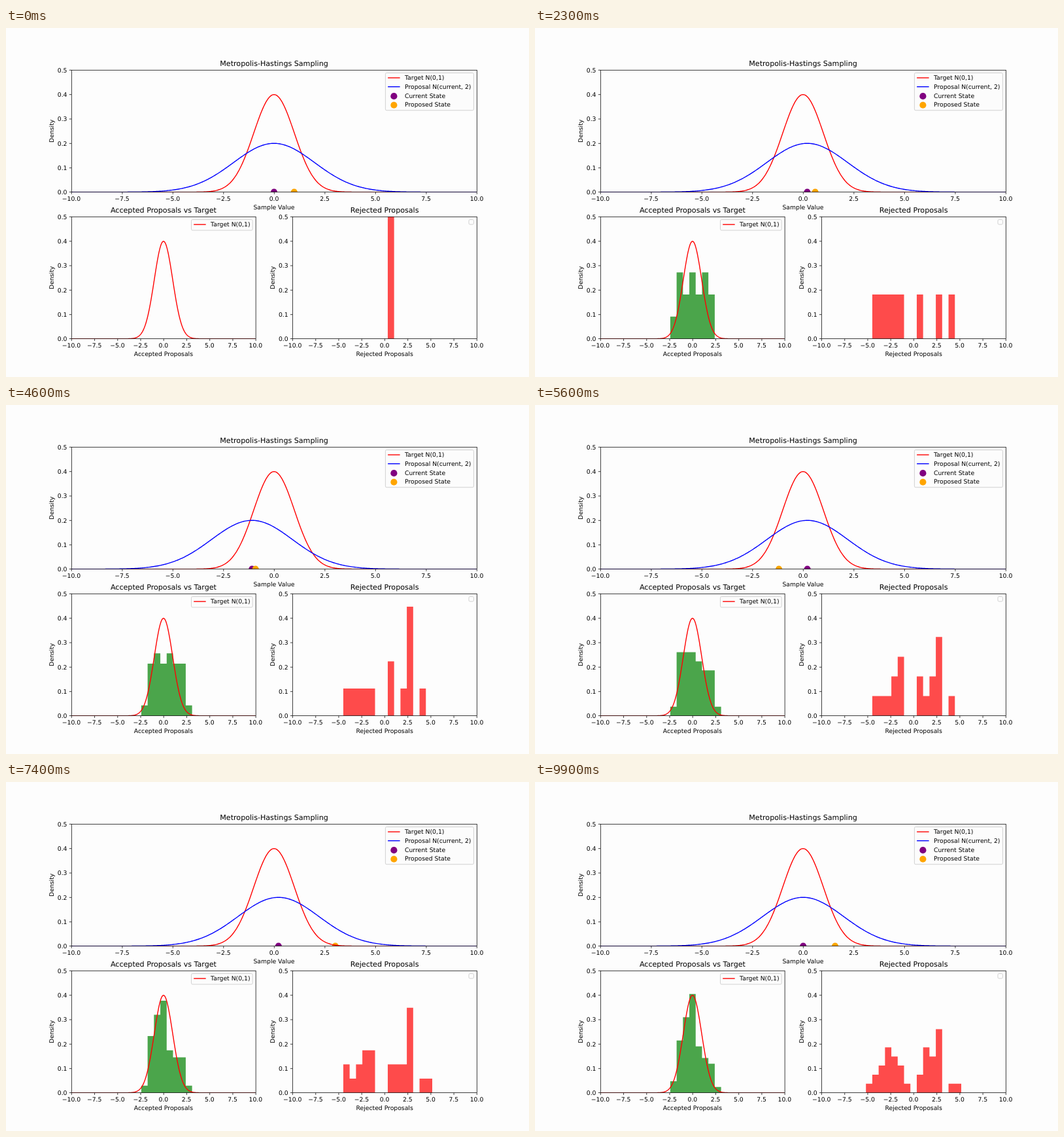
Recreate the animation shown at these times as an HTML page. Size 800x533 px, loop 10 s.

```html
<!DOCTYPE html>
<html lang="en">
<head>
<meta charset="utf-8">
<title>Metropolis-Hastings Sampling</title>
<style>
  html, body { margin: 0; width: 100%; height: 100%; overflow: hidden; background: #fdfdfd; }
  svg { display: block; width: 800px; height: 533px; }
  text { font: 9.26px "DejaVu Sans", sans-serif; text-rendering: geometricPrecision; }
  .title { font-size: 11.11px; }
  .mid { text-anchor: middle; }
  .end { text-anchor: end; }
  .line { fill: none; stroke-width: 1.39; stroke-linejoin: round; }
  .spine { fill: none; stroke: #000; stroke-width: .75; }
  .box { fill: #fdfdfd; fill-opacity: .8; stroke: #ccc; stroke-width: .9; }
</style>
</head>
<body>
<svg viewBox="0 0 800 533"></svg>
<script>
const svg = document.querySelector('svg');
const STEPS = 100, STEP_MS = 100, BINS = 29, HEIGHT = 186.67;

function add(parent, tag, attrs, text) {
  const el = document.createElementNS('http://www.w3.org/2000/svg', tag);
  for (const k in attrs) el.setAttribute(k, attrs[k]);
  if (text) el.textContent = text;
  parent.append(el);
  return el;
}

// Mersenne Twister giving 53-bit uniforms, with polar-method normals
function makeRandom(seed) {
  const s = new Uint32Array(624);
  let pos = 624, spare = null;
  s[0] = seed;
  for (let i = 1; i < 624; i++) s[i] = Math.imul(1812433253, s[i - 1] ^ (s[i - 1] >>> 30)) + i;
  function next() {
    if (pos === 624) {
      for (let i = 0; i < 624; i++) {
        const y = (s[i] & 0x80000000) | (s[(i + 1) % 624] & 0x7fffffff);
        s[i] = s[(i + 397) % 624] ^ (y >>> 1) ^ (y & 1 ? 0x9908b0df : 0);
      }
      pos = 0;
    }
    let y = s[pos++];
    y ^= y >>> 11;
    y ^= (y << 7) & 0x9d2c5680;
    y ^= (y << 15) & 0xefc60000;
    return (y ^ (y >>> 18)) >>> 0;
  }
  function uniform() {
    const a = next() >>> 5, b = next() >>> 6;
    return (a * 67108864 + b) / 9007199254740992;
  }
  function normal() {
    if (spare !== null) {
      const v = spare;
      spare = null;
      return v;
    }
    let a, b, r;
    do {
      a = 2 * uniform() - 1;
      b = 2 * uniform() - 1;
      r = a * a + b * b;
    } while (r >= 1 || r === 0);
    const f = Math.sqrt(-2 * Math.log(r) / r);
    spare = f * a;
    return f * b;
  }
  return { uniform, normal };
}

const density = (x, mean, sd) =>
  Math.exp(-(((x - mean) / sd) ** 2) / 2) / (sd * Math.sqrt(2 * Math.PI));

// Run the whole chain once
const random = makeRandom(42);
const chain = [];
for (let i = 0, current = 0; i < STEPS; i++) {
  const proposed = current + 2 * random.normal();
  const accepted = random.uniform() < density(proposed, 0, 1) / density(current, 0, 1);
  chain.push({ current, proposed, accepted });
  if (accepted) current = proposed;
}

function makePlot(id, left, top, width, title, xLabel) {
  const px = x => left + (x + 10) / 20 * width;
  const py = y => top + HEIGHT * (1 - y / 0.5);
  const bottom = top + HEIGHT, mid = left + width / 2;
  const clip = add(svg, 'clipPath', { id });
  add(clip, 'rect', { x: left, y: top, width, height: HEIGHT });
  const body = add(svg, 'g', { 'clip-path': `url(#${id})` });

  let ticks = '';
  for (let v = -10; v <= 10; v += 2.5) {
    ticks += `M${px(v) + .33} ${bottom}v3.24`;
    add(svg, 'text', { x: px(v), y: bottom + 13.5, class: 'mid' }, v.toFixed(1).replace('-', '\u2212'));
  }
  for (let i = 0; i <= 5; i++) {
    const y = py(i / 10);
    ticks += `M${left} ${y + (i ? .33 : -.17)}h-3.24`;
    add(svg, 'text', { x: left - 6.48, y: y + 3.5, class: 'end' }, (i / 10).toFixed(1));
  }
  add(svg, 'path', { d: ticks, class: 'spine' });
  add(svg, 'rect', { x: left + .33, y: top + .33, width, height: HEIGHT - .5, class: 'spine' });
  add(svg, 'text', { x: mid, y: top - 5.56, class: 'mid title' }, title);
  add(svg, 'text', { x: mid, y: bottom + 26, class: 'mid' }, xLabel);
  add(svg, 'text', {
    class: 'mid', transform: `translate(${left - 26.7} ${top + HEIGHT / 2}) rotate(-90)`
  }, 'Density');
  return { px, py, body };
}

function curve(plot, mean, sd) {
  const pts = [];
  for (let x = -10; x <= 10.01; x += 0.05) {
    pts.push(plot.px(x).toFixed(2) + ' ' + plot.py(density(x, mean, sd)).toFixed(2));
  }
  return 'M' + pts.join('L');
}

function addTarget(plot) {
  add(plot.body, 'path', { d: curve(plot, 0, 1), class: 'line', stroke: 'red' });
}

function addLegend(left, top, right, rows) {
  const height = 7.4 + Math.max(0, rows.length * 13.6 - 4.63);
  add(svg, 'rect', { x: left, y: top, width: right - left, height, rx: 1.85, class: 'box' });
  rows.forEach(([label, color, isDot], i) => {
    const y = top + 10.75 + i * 13.6, x = left + 3.7;
    if (isDot) add(svg, 'circle', { cx: x + 9.26, cy: y - 2.4, r: 5.1, fill: color });
    else add(svg, 'path', { d: `M${x} ${y - 3.24}h18.5`, class: 'line', stroke: color });
    add(svg, 'text', { x: x + 25.9, y }, label);
  });
}

const main = makePlot('main', 100, 64, 620, 'Metropolis-Hastings Sampling', 'Sample Value');
const kept = makePlot('kept', 100, 288, 281.82, 'Accepted Proposals vs Target', 'Accepted Proposals');
const lost = makePlot('lost', 438.18, 288, 281.82, 'Rejected Proposals', 'Rejected Proposals');

const currentDot = add(main.body, 'circle', { cy: main.py(0), r: 5.1, fill: 'purple' });
const proposedDot = add(main.body, 'circle', { cy: main.py(0), r: 5.1, fill: 'orange' });
addTarget(main);
const proposal = add(main.body, 'path', { class: 'line', stroke: 'blue' });
const keptBars = add(kept.body, 'path', { fill: 'green', opacity: .7 });
addTarget(kept);
const lostBars = add(lost.body, 'path', { fill: 'red', opacity: .7 });

addLegend(580.4, 68.6, 715.4, [
  ['Target N(0,1)', 'red'],
  ['Proposal N(current, 2)', 'blue'],
  ['Current State', 'purple', true],
  ['Proposed State', 'orange', true]
]);
addLegend(283.5, 292.6, 377.2, [['Target N(0,1)', 'red']]);
addLegend(708, 292.6, 715.4, []);

function histogram(plot, values) {
  const counts = Array(BINS).fill(0), size = 20 / BINS;
  for (const v of values) counts[Math.floor((v + 10) / size)]++;
  return counts.map((n, i) => {
    if (!n) return '';
    const x = -10 + i * size, y = n / (values.length * size);
    return `M${plot.px(x)} ${plot.py(0)}V${plot.py(y)}H${plot.px(x + size)}V${plot.py(0)}Z`;
  }).join('');
}

let shown = -1;
function draw() {
  const step = Math.floor(performance.now() / STEP_MS) % STEPS;
  if (step !== shown) {
    shown = step;
    const { current, proposed } = chain[step];
    const past = chain.slice(0, step + 1);
    const pick = ok => past.filter(s => s.accepted === ok).map(s => s.proposed);
    currentDot.setAttribute('cx', main.px(current));
    proposedDot.setAttribute('cx', main.px(proposed));
    proposal.setAttribute('d', curve(main, current, 2));
    keptBars.setAttribute('d', histogram(kept, pick(true)));
    lostBars.setAttribute('d', histogram(lost, pick(false)));
  }
  requestAnimationFrame(draw);
}
draw();
</script>
</body>
</html>
```
